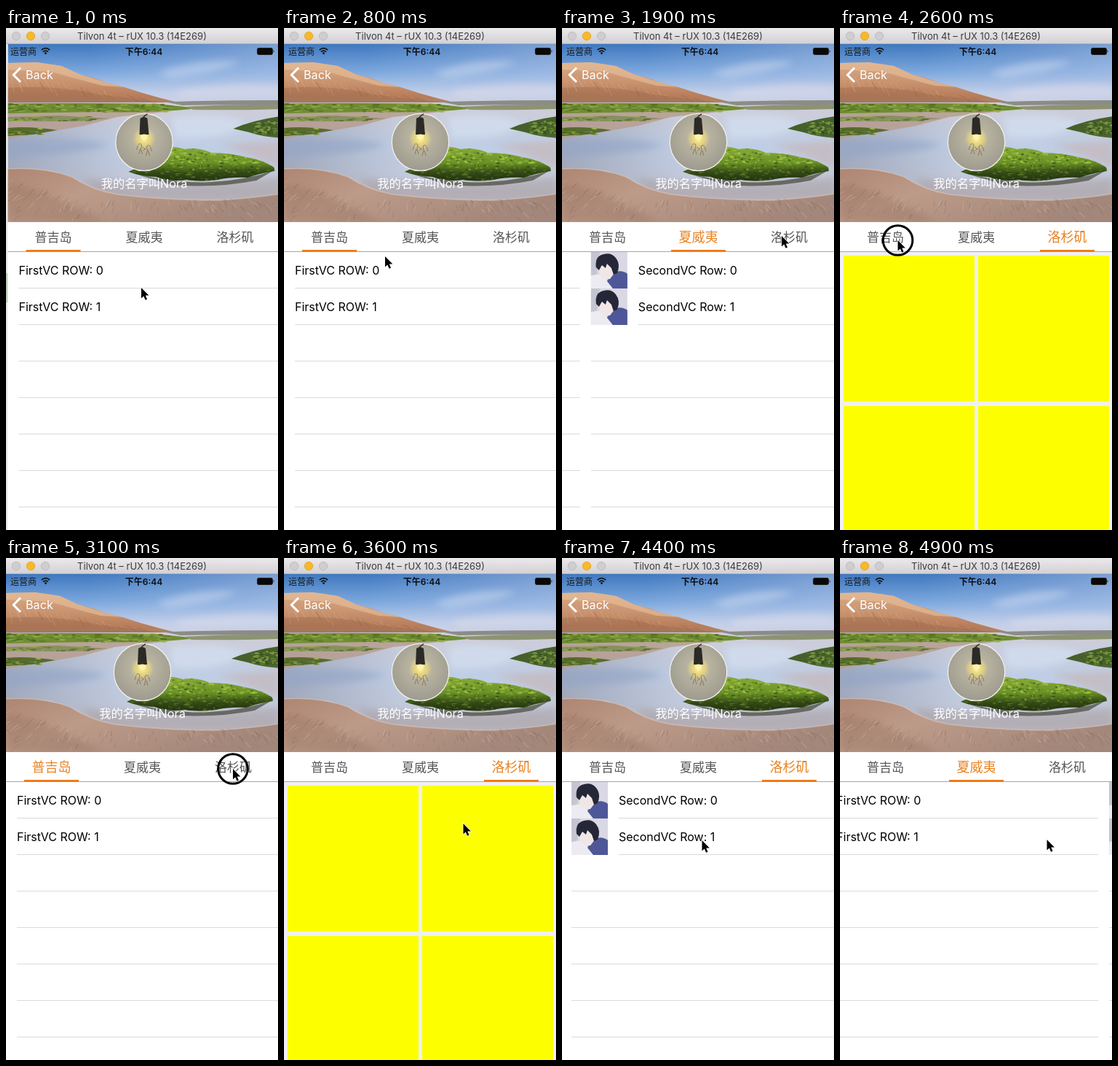
Write an HTML page that moves like this. It is 374x688 px and loops after 5000 ms.

```html
<!DOCTYPE html>
<html lang="zh-CN">
<head>
<meta charset="utf-8">
<title>Tabbed pages</title>
<style>
html, body { margin: 0; width: 100%; height: 100%; overflow: hidden; background: #fff; }
svg { display: block; width: 374px; height: 688px; }
text { font-family: Inter, "Noto Sans CJK SC", "Noto Sans CJK", sans-serif; white-space: pre; }
.mid { text-anchor: middle; }
</style>
</head>
<body>
<svg id="stage" viewBox="0 0 374 688" width="374" height="688" xmlns="http://www.w3.org/2000/svg">
  <defs>
    <linearGradient id="bar" x2="0" y2="1"><stop stop-color="#ebe9eb"/><stop offset="1" stop-color="#d2d0d2"/></linearGradient>
    <linearGradient id="sky" x2="0" y2="1"><stop stop-color="#3f78bf"/><stop offset=".45" stop-color="#7ba7dd"/><stop offset=".8" stop-color="#c3cfe8"/><stop offset="1" stop-color="#dcd6de"/></linearGradient>
    <linearGradient id="haze"><stop offset=".3" stop-color="#b9c8e8" stop-opacity="0"/><stop offset="1" stop-color="#b9c8e8" stop-opacity=".5"/></linearGradient>
    <linearGradient id="cliff" x2="0" y2="1"><stop stop-color="#d9aa84"/><stop offset=".45" stop-color="#c99470"/><stop offset=".8" stop-color="#b87d5a"/><stop offset="1" stop-color="#a88468"/></linearGradient>
    <linearGradient id="sea" x2="0" y2="1"><stop stop-color="#d0cdd6"/><stop offset=".35" stop-color="#c0cee5"/><stop offset=".65" stop-color="#c3cadb"/><stop offset="1" stop-color="#b3aab0"/></linearGradient>
    <linearGradient id="shade"><stop stop-color="#6f7284" stop-opacity=".4"/><stop offset=".45" stop-color="#6f7284" stop-opacity="0"/></linearGradient>
    <linearGradient id="sand" x2="1" y2=".5"><stop stop-color="#ae8672"/><stop offset=".4" stop-color="#bd9b89"/><stop offset="1" stop-color="#a3877a"/></linearGradient>
    <linearGradient id="moss" x2="0" y2="1"><stop stop-color="#8aa93a"/><stop offset=".45" stop-color="#6c9427"/><stop offset="1" stop-color="#293c14"/></linearGradient>
    <radialGradient id="wall" cx=".5" cy=".42" r=".6"><stop stop-color="#e3daa9"/><stop offset=".3" stop-color="#b9b4a0"/><stop offset="1" stop-color="#9c998e"/></radialGradient>
    <radialGradient id="glow"><stop stop-color="#fff6b0"/><stop offset=".4" stop-color="#f3dd72" stop-opacity=".75"/><stop offset="1" stop-color="#f3dd72" stop-opacity="0"/></radialGradient>
    <filter id="soft" x="-30%" y="-60%" width="160%" height="220%"><feGaussianBlur stdDeviation="5"/></filter>
    <filter id="fine"><feGaussianBlur stdDeviation=".7"/></filter>
    <clipPath id="photoClip"><path d="M0 22H376V266H0Z"/></clipPath>
    <clipPath id="pageClip"><path d="M0 307H376V688H0Z"/></clipPath>
    <clipPath id="mossClip"><path id="mossShape" d="M166 197Q184 190 194 177L206 165Q225 160 243 166Q262 163 280 171Q306 171 328 177Q352 181 366 191L367 196Q347 199 330 205Q306 204 288 208Q264 211 246 208Q222 211 204 204Q182 203 166 197Z"/></clipPath>
    <g id="portrait">
      <path d="M0 0H50V50H0Z" fill="#dad8e4"/>
      <path d="M0 0H12L8 30L0 34Z" fill="#c4c5d0"/>
      <path d="M0 32L16 30L30 50H0Z" fill="#ecebf2"/>
      <path d="M27 31Q40 22 50 30V50H30L22 40Z" fill="#4e5797"/>
      <path d="M10 20L12 31Q17 38 26 37L33 28L32 14Z" fill="#f1e6e6"/>
      <path d="M7 21Q5 8 14 4Q27 -1 34 8Q41 17 36 29L31 31L28 22L22 16L20 22L15 18L11 25Z" fill="#252738"/>
    </g>
  </defs>

  <rect width="374" height="688" fill="#e7e8e7"/>
  <rect y="336" width="6" height="40" fill="#b9cdbb"/>
  <g id="app">
    <rect y="22" width="376" height="666" fill="#fff"/>
    <g id="photo" clip-path="url(#photoClip)"></g>
    <g id="avatar">
      <circle cx="187.5" cy="156.5" r="39.2" fill="url(#wall)" stroke="#f4f4f0" stroke-width="1.2"/>
      <circle cx="187.5" cy="152" r="16" fill="url(#glow)"/>
      <path d="M192 118Q183 122 187 130" fill="none" stroke="#35332f" stroke-width="1.5"/>
      <path d="M182 124Q187 120 192 124L194 146H181Z" fill="#2b2a27"/>
      <ellipse cx="187.5" cy="149" rx="5" ry="3.5" fill="#fff4ab"/>
      <path d="M179 160q3-3 5 0l-1 6 2 7m-3-7l-2 7m-1-12l-2 6m8-4l4 3m7-4q-3-3-5 0l1 6-2 7m3-7l2 7m1-12l2 6m-8-4l-4 3" fill="none" stroke="#80694e" stroke-width=".8"/>
    </g>
    <text class="mid" x="187.5" y="219" font-size="16.3" fill="#fff">我的名字叫Nora</text>
    <g id="pages" clip-path="url(#pageClip)"></g>
    <rect y="266" width="376" height="40" fill="#fff"/>
    <rect y="306" width="376" height="1" fill="#a6a6a6"/>
    <g id="tabs"></g>
    <rect id="mark" y="304" width="75" height="3" fill="#ef7b1a"/>
  </g>

  <g id="status">
    <text x="6" y="36.5" font-size="12" fill="#15181c">运营商</text>
    <g fill="none" stroke="#111" stroke-width="1.7">
      <path d="M48.8 30.2Q54.5 25.2 60.2 30.2M51 32.6Q54.5 29.6 58 32.6"/>
      <path d="M52.6 34L54.5 36.4L56.4 34Q54.5 32.7 52.6 34Z" fill="#111" stroke="none"/>
    </g>
    <text class="mid" x="189.5" y="36.5" font-size="12" font-weight="600" fill="#0c0e12">下午6:44</text>
    <rect x="345.5" y="27.5" width="21" height="9" rx="2" fill="#080808" stroke="#222"/>
    <path d="M367.6 30.3q2 1.7 0 3.4z" fill="#111"/>
    <path d="M20 54.5L10.3 64.3L20 74" fill="none" stroke="#fff" stroke-width="3"/>
    <text x="27" y="70" font-size="16.2" fill="#fff">Back</text>
  </g>

  <rect width="374" height="22" fill="url(#bar)"/>
  <rect y="21" width="374" height="1" fill="#b7b5b7"/>
  <g stroke-width=".8">
    <circle cx="14" cy="11" r="5.7" fill="#cfcdcf" stroke="#b9b7b9"/>
    <circle cx="34" cy="11" r="5.7" fill="#f8b928" stroke="#dda02a"/>
    <circle cx="54" cy="11" r="5.7" fill="#cfcdcf" stroke="#b9b7b9"/>
  </g>
  <text class="mid" x="187" y="16" font-size="13" fill="#3c3c3c">Tilvon 4t – rUX 10.3 (14E269)</text>

  <g id="pointer">
    <circle id="ring" r="20.3" fill="none" stroke="#000" stroke-width="3"/>
    <path d="M0 0V14.5L3.3 11.5L5.6 16.8L8 15.7L5.8 10.6H10.4Z" fill="#000" stroke="#fff" stroke-width="1.6" paint-order="stroke"/>
  </g>
</svg>
<script>
const $ = id => document.getElementById(id);
const W = 375, LOOP = 5000, STEP = 100;

// Deterministic noise for the shore textures
let seed = 17;
const rnd = (a = 0, b = 1) => {
  seed = (seed * 16807) % 2147483647;
  return a + (b - a) * seed / 2147483647;
};
const pick = list => list[Math.floor(rnd(0, list.length))];
const path = (d, fill, extra = '') => `<path d="${d}" fill="${fill}" ${extra}/>`;
const rect = (x, y, w, h, fill) => `<rect x="${x}" y="${y}" width="${w}" height="${h}" fill="${fill}"/>`;

function specks(n, box, rx, ry, colors, opacity = 1) {
  let out = '';
  for (let i = 0; i < n; i++) {
    const x = rnd(box[0], box[2]).toFixed(1), y = rnd(box[1], box[3]).toFixed(1);
    out += `<ellipse cx="${x}" cy="${y}" rx="${rnd(rx / 3, rx).toFixed(1)}" ry="${rnd(ry / 3, ry).toFixed(1)}" fill="${pick(colors)}" opacity="${opacity}"/>`;
  }
  return out;
}

function drawSky() {
  const soft = 'filter="url(#soft)"';
  return rect(0, 22, 376, 84, 'url(#sky)') + rect(0, 22, 376, 84, 'url(#haze)') +
    path('M205 62Q260 40 320 46Q290 62 225 68Z', '#dfe4f3', 'opacity=".4" ' + soft) +
    path('M230 86Q310 72 376 78V94H240Z', '#e4e1ea', 'opacity=".45" ' + soft);
}

function drawCliff() {
  const top = 'M0 48L40 47L74 52L100 64L120 69L136 75L160 81L185 89L210 96L234 102';
  let s = path(top + 'V105H0Z', 'url(#cliff)');
  s += path('M0 48L40 47L74 52L100 64L136 75L160 81L130 79L96 70L60 60L0 57Z', '#e6bd98', 'opacity=".65"');
  s += path('M0 82Q70 78 125 91L215 102V105H0Z', '#93664b', 'opacity=".35" filter="url(#fine)"');
  for (let x = 4; x < 190; x += 8) {
    const y = 60 + x * .19 + rnd(0, 6);
    s += `<path d="M${x} ${y}l${rnd(3, 10)} ${Math.max(4, 97 - y) * rnd(.4, .9)}" stroke="${pick(['#8f5b3f', '#e2b797'])}" stroke-width="${rnd(.6, 1.6)}" opacity=".35"/>`;
  }
  return s;
}

function drawWater() {
  const olive = ['#83a03a', '#5d7c28', '#9bb04e', '#4a6422'];
  const soft = 'filter="url(#soft)"';
  let s = rect(0, 102, 376, 164, 'url(#sea)') + rect(0, 102, 376, 164, 'url(#shade)');
  s += path('M0 114H225L150 122L105 134L0 152Z', '#b89f92', 'opacity=".85" filter="url(#fine)"');
  s += path('M0 104Q90 102 205 104L262 110Q200 117 120 115L0 117Z', '#6f8d31');
  s += path('M215 101Q300 99 376 99V105Q300 105 240 106Z', '#8b8c88');
  s += path('M245 108Q310 104 376 105V111Q310 113 255 112Z', '#8c9372');
  s += specks(120, [0, 104, 225, 115], 6, 1.4, olive, .8);
  s += path('M0 122L70 120L140 124L92 128L0 128Z', '#7d8c50', 'opacity=".8"') + specks(35, [0, 121, 120, 128], 6, 1, olive, .8);
  s += path('M0 137Q28 134 68 140L34 146L0 148Z', '#586b2e') + specks(28, [0, 138, 46, 146], 6, 1.2, olive);
  s += path('M0 156Q80 146 140 160Q90 176 0 176Z', '#93a4c6', 'opacity=".6" ' + soft);
  s += path('M225 122Q290 114 330 130Q300 154 230 150Z', '#d3dff1', 'opacity=".75" ' + soft);
  s += path('M310 138Q338 126 376 121V151Q350 149 332 143Z', '#45602a');
  s += specks(80, [338, 128, 375, 146], 3.5, 1.4, ['#6a8a34', '#33491c', '#56752b', '#87a047'], .85);
  return s + path('M376 154V192Q330 172 290 160Z', '#c4b8bc', 'opacity=".75" ' + soft);
}

function drawSand() {
  const soft = 'filter="url(#soft)"';
  const edge = 'M0 193Q50 190 88 204Q116 222 150 228Q215 236 290 236Q340 233 376 227';
  let s = path('M100 205Q220 220 376 204V236H130Z', '#aca2a6', 'opacity=".6" ' + soft);
  s += path(edge + 'V266H0Z', 'url(#sand)', 'filter="url(#fine)"');
  s += path(edge, 'none', 'stroke="#dccabf" stroke-width="1.6" opacity=".55" filter="url(#fine)"');
  s += path('M0 214Q45 219 85 242L135 266H0Z', '#8b6655', 'opacity=".3" ' + soft);
  // Ripples fan out below the wet edge
  for (let i = 0; i < 130; i++) {
    const x = rnd(0, 374), low = x < 90 ? 206 + x * .25 : 234;
    const y = low + rnd(0, 264 - low) * rnd(.2, 1), lean = (x - 190) / 40;
    s += `<path d="M${x} ${y}q${lean} ${rnd(1, 3)} ${lean * 2 + rnd(-2, 2)} ${rnd(4, 9)}" fill="none" stroke="${pick(['#7b5d50', '#d9bfae', '#86695b'])}" stroke-width="${rnd(.5, 1.2)}" opacity=".4"/>`;
  }
  return s;
}

function drawMoss() {
  const greens = ['#8fb534', '#6f9a2a', '#47651c', '#b2cc4e', '#2f4515', '#587f22'];
  const shadow = path('M172 199Q235 214 280 211Q330 208 366 195L342 209Q285 220 225 215Z', '#4c4f42', 'opacity=".75" filter="url(#fine)"');
  return shadow + '<use href="#mossShape" fill="url(#moss)"/><g clip-path="url(#mossClip)">' +
    specks(430, [166, 160, 368, 210], 3.2, 1.6, greens, .6) +
    path('M166 195Q205 190 245 198Q290 193 368 191V214H166Z', '#1c2b0d', 'opacity=".5" filter="url(#soft)"') +
    specks(60, [205, 163, 350, 186], 4, 1.6, ['#b4d044', '#9cc03a'], .6) + '</g>';
}

const line = (x, y) => rect(x, y, W - x, 1, '#dadadc');
const label = (x, y, str) => `<text x="${x}" y="${y}" font-size="16" fill="#000">${str}</text>`;

function drawPages() {
  const pages = [rect(0, 307, W, 381, '#fff'), rect(0, 307, W, 381, '#fff'), rect(0, 307, W, 381, '#f0f0f0')];
  for (let r = 0; r < 7; r++) {
    const y = 307 + r * 50, filled = r < 2;
    pages[0] += line(15, y + 49);
    pages[1] += line(filled ? 80 : 15, y + 49);
    if (!filled) continue;
    pages[0] += label(15, y + 31, 'FirstVC ROW: ' + r);
    pages[1] += `<use href="#portrait" x="15" y="${y}"/>` + label(80, y + 31, 'SecondVC Row: ' + r);
    for (const x of [5, 190]) pages[2] += rect(x, 312 + r * 206, 180, 200, '#fdff00');
  }
  $('pages').innerHTML = '<g id="strip">' +
    pages.map((p, i) => `<g transform="translate(${i * W})">${p}</g>`).join('') + '</g>';
}

function drawTabs() {
  $('tabs').innerHTML = ['普吉岛', '夏威夷', '洛杉矶']
    .map((name, i) => `<text class="mid" x="${62.5 + i * 125}" y="293">${name}</text>`).join('');
}

const smooth = p => p * p * (3 - 2 * p);
const cubicInOut = p => p < .5 ? 4 * p ** 3 : 1 - 4 * (1 - p) ** 3;
const cubicOut = p => 1 - (1 - p) ** 3;

// Each move: start, end, target, easing
function follow(value, moves, t) {
  for (const [a, b, to, ease] of moves) {
    if (t <= a) break;
    value += (to - value) * ease(Math.min(1, (t - a) / (b - a)));
  }
  return value;
}

const scrolls = [
  [1602, 2002, 375, cubicInOut],
  [2160, 2500, 750, cubicInOut],
  [2680, 3020, 0, cubicInOut],
  [3180, 3540, 750, cubicInOut],
  [3750, 4050, 610, smooth],
  [4050, 4490, 375, cubicOut],
  [4500, 4720, 250, smooth],
  [4720, 5036, 0, cubicOut]
];
const selections = [[1600, 1], [2160, 2], [2680, 0], [3180, 2], [4490, 1]];
const marks = selections.map(([at, tab]) => [at, at + 220, 25 + tab * 125, smooth]);
const presses = [[1520, 1640], [2060, 2180], [2560, 2690], [3080, 3200], [3750, 4050], [4500, 4720]];
const stops = [
  [0, 186, 356], [300, 188, 370], [600, 186, 377], [800, 139, 313], [1450, 187, 290], [1640, 187, 290],
  [1900, 302, 285], [2060, 312, 288], [2180, 312, 288], [2560, 79.5, 291], [2700, 79.5, 291],
  [3070, 312, 289], [3200, 312, 289], [3600, 246.5, 364], [3750, 130, 372], [4050, 270, 378],
  [4400, 192.5, 387], [4500, 160, 387], [4720, 284.5, 386]
];
const pointerAxis = axis => stops.slice(1).map((s, i) => [stops[i][0], s[0], s[axis], smooth]);
const moveX = pointerAxis(1), moveY = pointerAxis(2);

function update(t) {
  const push = t < 200 ? 2.5 * (1 - t / 200) ** 2 : 0;
  $('app').setAttribute('transform', `translate(${push})`);
  $('strip').setAttribute('transform', `translate(${-follow(0, scrolls, t)})`);
  $('mark').setAttribute('x', follow(25, marks, t));

  const current = selections.filter(s => s[0] <= t).pop();
  [...$('tabs').children].forEach((tab, i) => {
    const on = current && current[1] === i;
    tab.setAttribute('fill', on ? '#e88222' : '#555');
    tab.setAttribute('font-size', on ? 18 : 17);
  });

  $('pointer').setAttribute('transform', `translate(${follow(186, moveX, t)} ${follow(356, moveY, t)})`);
  $('ring').setAttribute('visibility', presses.some(([a, b]) => t >= a && t < b) ? 'visible' : 'hidden');
}

$('photo').innerHTML = drawSky() + drawCliff() + drawWater() + drawSand() + drawMoss();
drawPages();
drawTabs();
update(0);

let start;
function frame(now) {
  start ??= now;
  update(Math.floor((now - start) % LOOP / STEP) * STEP);
  requestAnimationFrame(frame);
}
requestAnimationFrame(frame);
</script>
</body>
</html>
```
